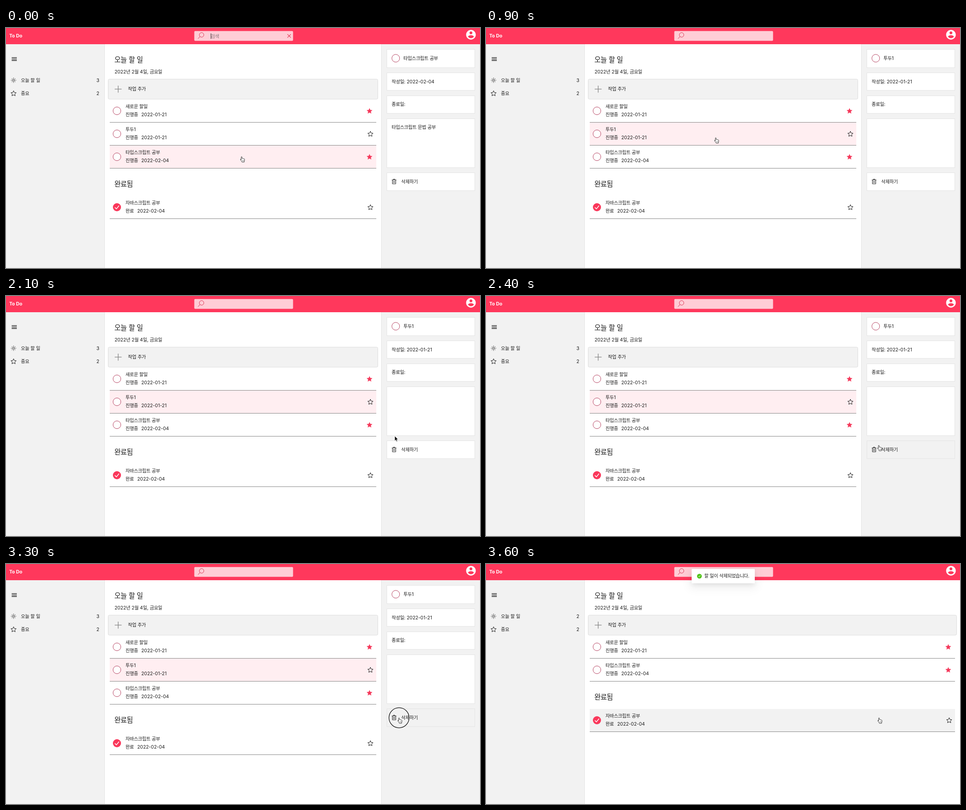
Recreate the animation shown at these times as an HTML page. Size 1051 by 533 pixels, loop 4.1 s.

```html
<!DOCTYPE html>
<html lang="ko">
<head>
<meta charset="utf-8">
<title>To Do</title>
<style>
  html, body { margin: 0; width: 100%; height: 100%; overflow: hidden; background: #fff; }
  svg { position: absolute; left: 0; top: 0; display: block; }
  body, text { font-family: Inter, "Noto Sans CJK KR", "Noto Sans CJK", sans-serif; }
  text { white-space: pre; }
  .ko { letter-spacing: -.035em; }
  #toast {
    position: absolute; left: 455.5px; top: 11px; width: 140px; height: 31.5px;
    background: #fff; border-radius: 1.5px;
    box-shadow: 0 2px 4px -3px rgba(0,0,0,.12), 0 4px 12px rgba(0,0,0,.08), 0 7px 20px 6px rgba(0,0,0,.05);
  }
</style>
</head>
<body>
<svg id="app" width="1051" height="533"></svg>
<div id="toast"></div>
<svg id="pointer" width="1051" height="533"></svg>
<script>
const LOOP = 4100, STEP = 100;
const RED = '#ff385c', GREY = '#f2f2f2', PINK = '#ffeef1', INK = '#1c1c1c';
const $ = id => document.getElementById(id);

// Pointer tip: time, x, y
const PATH = [
  [0, 522.5, 285.5], [100, 522, 284.5], [200, 520, 279], [300, 516.5, 267],
  [400, 512.5, 254], [500, 510.5, 246], [600, 509.5, 243.5],
  [1400, 520, 243], [1500, 600, 247], [1600, 740, 265], [1700, 832, 281], [1800, 853, 296], [1900, 858, 301],
  [2000, 859, 304], [2100, 862, 311], [2200, 866, 320], [2300, 869, 327], [2400, 871, 331.5], [2500, 871, 335],
  [2600, 871, 337.5], [2700, 871.2, 340], [2800, 871.5, 341.5]
];
const CLICKS = [700, 3300];
const TOAST = { 3400: [-20, .45], 3500: [-4, .88] };

const TODOS = [
  { name: '새로운 할일', date: '2022-01-21', star: true, memo: '' },
  { name: '투두1', date: '2022-01-21', star: false, memo: '' },
  { name: '타입스크립트 공부', date: '2022-02-04', star: true, memo: '타입스크립트 문법 공부' }
];
const DONE = { name: '자바스크립트 공부', date: '2022-02-04', star: false, done: true };

const rect = (x, y, w, h, fill, extra = '') =>
  `<rect x="${x}" y="${y}" width="${w}" height="${h}" fill="${fill}" ${extra}/>`;
const line = (d, color, width = 1) =>
  `<path d="${d}" fill="none" stroke="${color}" stroke-width="${width}" stroke-linejoin="round"/>`;
const disc = (x, y, r, fill, stroke = 'none', width = 1) =>
  `<circle cx="${x}" cy="${y}" r="${r}" fill="${fill}" stroke="${stroke}" stroke-width="${width}"/>`;

// Text centred vertically on cy
function text(x, cy, str, { size = 10.4, fill = INK, weight = 400 } = {}) {
  const body = str.replace(/[가-힣]+/g, '<tspan class="ko">$&</tspan>');
  return `<text x="${x}" y="${cy + size * .37}" font-size="${size}" font-weight="${weight}" fill="${fill}">${body}</text>`;
}

function star(cx, cy, filled) {
  const points = Array.from({ length: 10 }, (_, i) => {
    const r = i % 2 ? 2.9 : 6.2, a = Math.PI * (i / 5 - .5);
    return `${(cx + r * Math.cos(a)).toFixed(2)},${(cy + .6 + r * Math.sin(a)).toFixed(2)}`;
  });
  const [fill, stroke] = filled ? ['#f4385a', '#f4385a'] : ['none', INK];
  return `<polygon points="${points.join(' ')}" fill="${fill}" stroke="${stroke}" stroke-width="${filled ? .5 : 1}" stroke-linejoin="round"/>`;
}

const ring = (x, y) => disc(x, y, 8.6, '#fff', '#b5405f');
const tick = (x, y, s, width) =>
  line(`M${x - 4.6 * s} ${y + .4 * s}l3.3 3.3 6-7.2`.replace('l3.3 3.3 6-7.2', `l${3.3 * s} ${3.3 * s} ${6 * s} ${-7.2 * s}`), '#fff', width);

function sun(x, y) {
  let rays = '';
  for (let i = 0; i < 8; i++) {
    const c = Math.cos(i * Math.PI / 4), s = Math.sin(i * Math.PI / 4);
    rays += `M${x + 3.8 * c} ${y + 3.8 * s}L${x + 5.6 * c} ${y + 5.6 * s}`;
  }
  return disc(x, y, 2.2, 'none', INK) + line(rays, INK);
}

function row(todo, cy, right, bg) {
  const mark = todo.done ? disc(246, cy, 9, '#fa385b') + tick(246, cy, 1, 1.5) : ring(246, cy);
  return rect(230, cy - 25, right - 230, 50, bg) + rect(230, cy + 25, right - 230, 1, '#858585') + mark +
    text(265, cy - 10.3, todo.name) +
    text(265, cy + 8, todo.done ? '완료' : '진행중') + text(todo.done ? 291 : 300, cy + 8, todo.date) +
    star(right - (todo.star ? 15 : 13), cy, todo.star);
}

function header(focused, caret) {
  let out = rect(0, 0, 1051, 36, RED) +
    text(7.2, 17.5, 'To Do', { fill: '#fff', weight: 700 }) +
    rect(417.5, 6.8, 219, 21.7, '#ffcdd6', 'rx="2"') +
    disc(433.7, 15.3, 5, 'none', '#dc2f50') + line('M430.2 18.9L425.8 23.8', '#dc2f50') +
    `<path transform="translate(1018.1 2.2) scale(1.07)" fill="#fff" d="M12 2C6.48 2 2 6.48 2 12s4.48 10 10 10 10-4.48 10-10S17.52 2 12 2zm0 3c1.66 0 3 1.34 3 3s-1.34 3-3 3-3-1.34-3-3 1.34-3 3-3zm0 14.2c-2.5 0-4.71-1.28-6-3.22.03-1.99 4-3.08 6-3.08 1.99 0 5.97 1.09 6 3.08-1.29 1.94-3.5 3.22-6 3.22z"/>`;
  if (focused) out += text(454, 17.7, '검색', { fill: '#8b777c' }) + line('M624 13.8l7.6 7.6m0-7.6l-7.6 7.6', '#e0304f', 1.1);
  if (caret) out += rect(454, 12, 1, 12, '#222');
  return out;
}

const sidebar = count => rect(0, 36, 218, 497, GREY) + rect(218, 36, 1, 497, '#e2e2e2') +
  line('M12.6 65.6h11.4m-11.4 3.3h11.4m-11.4 3.3h11.4', '#111', 1.4) +
  sun(16.8, 116) + text(33, 116, '오늘 할 일') + text(200.5, 116, String(count)) +
  star(16.8, 145, false) + text(33, 145, '중요') + text(200.5, 145, '2');

function detail(todo, hoverDelete) {
  const card = (y, h, fill = '#fff') => rect(844.5, y, 195, h, fill, 'stroke="#e4e4e4" stroke-width="1"');
  return rect(832, 36, 219, 497, GREY) + rect(832, 36, 1, 497, '#e2e2e2') +
    card(47.5, 40.5) + ring(864.2, 67.2) + text(881.3, 67, todo.name) +
    card(99.5, 39) + text(855, 119, '작성일: ' + todo.date) +
    card(150.5, 39) + text(855, 169.5, '종료일:') +
    card(201.5, 108.5) + text(855, 220.3, todo.memo) +
    card(321.5, 39.5, hoverDelete ? GREY : '#fff') +
    line('M855.5 337.5h10m-6.7 0v-1.8h3.4v1.8m-5.4 0v8.6h7.4v-8.6m-5 2.2v4.4m2.6-4.4v4.4', INK) +
    text(876.3, 341, '삭제하기');
}

const tipAt = t => PATH.filter(p => p[0] <= Math.max(t, 0)).pop().slice(1);

function drawApp(t) {
  const deleted = t >= 3400, right = deleted ? 1040 : 821;
  const selected = deleted ? null : TODOS[t < 800 ? 2 : 1];
  const todos = deleted ? [TODOS[0], TODOS[2]] : TODOS;
  const [hx, hy] = tipAt(t - STEP); // hover colours trail the pointer by one step
  const background = (todo, cy) => {
    if (todo === selected) return t === 800 ? '#f8f0f2' : PINK;
    return hx < right && Math.abs(hy - cy) < 25 ? GREY : '#fff';
  };
  const place = (todo, cy) => row(todo, cy, right, background(todo, cy));
  const doneY = 245 + 51 * todos.length;

  $('app').innerHTML = rect(0, 0, 1051, 533, '#fff') +
    sidebar(todos.length) +
    text(240.3, 70, '오늘 할 일', { size: 15.4 }) +
    text(240.7, 97, '2022년 2월 4일, 금요일') +
    rect(226.5, 113.5, right - 223.5 + .5, 44.5, GREY, 'rx="3" stroke="#dcdcdc"') +
    line('M241 135.7h15.4m-7.7-7.7v15.4', '#858585', 1.3) + text(270.3, 135.5, '작업 추가') +
    todos.map((todo, i) => place(todo, 184 + 51 * i)).join('') +
    text(240.3, doneY - 52, '완료됨', { size: 15.4 }) +
    place(DONE, doneY) +
    (deleted ? '' : detail(selected, hx > 844 && hy > 321)) +
    header(t < 700, t < 300);
}

function drawToast(t) {
  const [y, opacity] = TOAST[t] || [0, t >= 3400 ? 1 : 0];
  $('toast').style.transform = `translateY(${y}px)`;
  $('toast').style.opacity = opacity;
}

function drawPointer(t) {
  const [x, y] = tipAt(t);
  const hand = x < 821 || y > 322;
  const shape = hand
    ? '<path d="M-1 7V1.2q0-1 .9-1 .8 0 .9 1l.6 3.3q.9-.8 1.8.1 1-.5 1.7.4 1.4-.4 1.5 1v2.5q0 1-.7 2v1.8h-5l-.6-1.6q-1.8-2-2.8-4-.2-1.2 1-1z" fill="#fff" stroke="#222" stroke-width=".9" stroke-linejoin="round"/><path d="M1.6 8v2.4m1.5-2.4v2.4m1.5-2.4v2.4" stroke="#444" stroke-width=".6"/>'
    : '<path d="M0 0V10.6L2.4 8.4 4 12.2 5.8 11.4 4.2 7.8H7.3Z" fill="#000" stroke="#fff" stroke-width=".7"/>';
  $('pointer').innerHTML = `<g transform="translate(${x} ${y})">${shape}</g>` +
    (CLICKS.includes(t) ? disc(x, y, 22.3, 'none', '#111', 1.3) : '');
}

$('toast').innerHTML = '<svg width="140" height="32">' +
  disc(17.2, 16, 5.3, '#52c41a') + tick(17.2, 16, .5, 1) +
  text(28, 15.4, '할 일이 삭제되었습니다.', { size: 10.3 }) + '</svg>';

const start = performance.now();
let shown = -1;
function tickFrame() {
  const t = Math.floor((performance.now() - start) % LOOP / STEP) * STEP;
  if (t !== shown) {
    shown = t;
    drawApp(t);
    drawToast(t);
    drawPointer(t);
  }
  requestAnimationFrame(tickFrame);
}
tickFrame();
</script>
</body>
</html>
```
